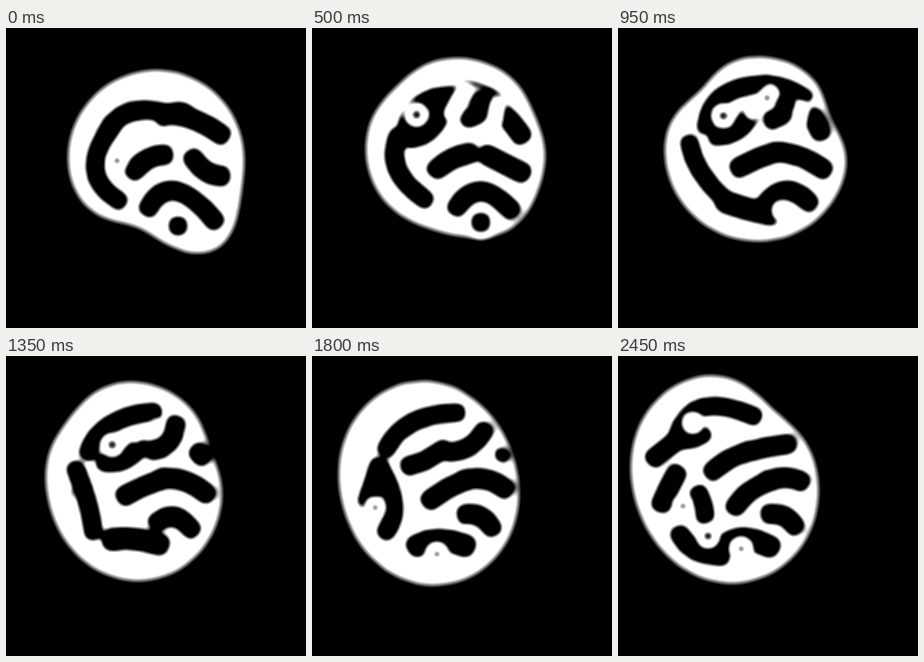
An HTML page with a canvas for the animation above (2.5 s loop, 300 px wide and 300 px high).

```html
<!DOCTYPE html>
<html>
<head>
<meta charset="utf-8">
<style>
  html, body { margin: 0; width: 100%; height: 100%; overflow: hidden; background: #000; }
  canvas { display: block; width: 300px; height: 300px; }
</style>
</head>
<body>
<canvas id="stage" width="300" height="300"></canvas>
<script>
const LOOP = 2500, STEP = 50, FADE = 250, CELL = 3;
const BLACK = '#000', WHITE = '#fff', DEG = Math.PI / 180;

const stage = document.getElementById('stage').getContext('2d');
const grid = document.createElement('canvas');
grid.width = grid.height = 300 / CELL;
const ctx = grid.getContext('2d');
ctx.scale(1 / CELL, 1 / CELL);
ctx.lineCap = 'round';

const clamp = v => Math.min(1, Math.max(0, v));
const smooth = v => (v = clamp(v), v * v * (3 - 2 * v));
const bell = (d, spread) => Math.exp(-((d / spread) ** 2));

// Position on evenly spaced poses, u from 0 to 1
function along(poses, u) {
  const at = clamp(u) * (poses.length - 1);
  const i = Math.min(Math.floor(at), poses.length - 2);
  return poses[i].map((v, k) => v + (poses[i + 1][k] - v) * (at - i));
}

// Parts grow after birth and shrink before death, except across the loop's ends
function size(t, born, dies) {
  const grow = born === 0 ? 1 : smooth((t - born) / FADE);
  const shrink = dies === LOOP ? 1 : smooth((dies - t) / FADE);
  return Math.min(grow, shrink);
}

const path = [[150, 130], [144, 120], [138, 121], [124, 127], [112, 127], [106, 122]];

// Bulges and dents of the outline: angle, spread, height, peak time
const lobes = [
  [56, 26, 22, 0], [107, 30, -17, 0],
  [225, 22, -11, 950], [337, 22, -12, 950],
  [304, 28, -12, LOOP]
];

function radius(angle, t) {
  const tilt = -20 * t / LOOP;
  const stretch = -7 * smooth((t - 900) / 600) * Math.cos(2 * (angle - tilt) * DEG);
  return lobes.reduce((r, [at, spread, height, peak]) => {
    const turn = (angle - at + 540) % 360 - 180;
    return r + height * bell(turn, spread) * bell(t - peak, 480);
  }, 88 + 11 * t / LOOP + stretch);
}

function drawBody(t) {
  const [cx, cy] = along(path, t / LOOP);
  ctx.beginPath();
  for (let a = 0; a < 360; a += 4) {
    const r = radius(a, t);
    ctx.lineTo(cx + r * Math.cos(a * DEG), cy + r * Math.sin(a * DEG));
  }
  ctx.fillStyle = WHITE;
  ctx.filter = 'blur(1px)';
  ctx.fill();
  ctx.filter = 'none';
}

// A band is an arc through three points that drifts from pose to pose
const band = (color, born, dies, width, ...poses) => t => {
  const s = size(t, born, dies);
  if (s < 0.05) return;
  const [ax, ay, mx, my, bx, by] = along(poses, (t - born) / (dies - born));
  ctx.strokeStyle = color;
  ctx.lineWidth = width * s;
  ctx.beginPath();
  ctx.moveTo(ax, ay);
  ctx.quadraticCurveTo(2 * mx - (ax + bx) / 2, 2 * my - (ay + by) / 2, bx, by);
  ctx.stroke();
};

function drawDot(color, diameter, x, y) {
  ctx.fillStyle = color;
  ctx.beginPath();
  ctx.arc(x, y, diameter / 2, 0, 2 * Math.PI);
  ctx.fill();
}

const ring = (born, dies, outer, inner, from, to = from) => t => {
  const s = size(t, born, dies);
  const [x, y] = along([from, to], (t - born) / (dies - born));
  drawDot(WHITE, outer * s, x, y);
  drawDot(BLACK, inner * s, x, y);
};

const parts = [
  // Long left fold
  band(BLACK, 0, LOOP, 19, [112, 172, 89, 140, 106, 98], [112, 170, 83, 143, 72, 116],
    [72, 178, 81, 150, 69, 113], [88, 157, 86, 150, 82, 140]),
  // Arch over the top
  band(BLACK, 0, LOOP, 19, [100, 106, 124, 84, 165, 86], [90, 98, 106, 67, 148, 56],
    [78, 94, 104, 69, 146, 56], [58, 80, 84, 50, 134, 60]),
  band(BLACK, 400, 1200, 14, [152, 54, 170, 58, 188, 68], [152, 54, 170, 58, 188, 68]),
  band(BLACK, 0, 1950, 21, [165, 86, 190, 92, 214, 106], [197, 84, 203, 95, 207, 106],
    [194, 97, 195, 98, 196, 99], [188, 99, 189, 99, 190, 100]),
  // Upper pair that joins into one bar
  band(BLACK, 150, LOOP, 20, [100, 112, 116, 102, 126, 84], [100, 106, 118, 104, 133, 92],
    [95, 115, 109, 104, 128, 96]),
  band(BLACK, 0, LOOP, 20, [158, 88, 170, 84, 180, 86], [157, 91, 167, 82, 166, 62],
    [142, 96, 160, 90, 172, 73], [128, 96, 148, 91, 169, 89]),
  // Middle chevron
  band(BLACK, 0, LOOP, 21, [129, 142, 142, 131, 157, 127], [120, 138, 138, 130, 157, 123],
    [118, 150, 131, 136, 150, 125]),
  band(BLACK, 0, LOOP, 21, [188, 131, 200, 143, 214, 148], [157, 122, 180, 125, 201, 138],
    [150, 125, 167, 121, 181, 124]),
  // Lower chevron
  band(BLACK, 0, LOOP, 20, [143, 179, 170, 163, 208, 192], [147, 178, 168, 163, 192, 174],
    [155, 158, 169, 160, 180, 171], [152, 158, 166, 160, 176, 169]),
  // Folds along the bottom and the left side
  band(BLACK, 600, LOOP, 23, [110, 166, 128, 178, 150, 184], [106, 188, 128, 184, 153, 189],
    [104, 192, 125, 183, 151, 190]),
  band(BLACK, 1850, LOOP, 20, [66, 178, 72, 184, 78, 188], [62, 179, 78, 195, 104, 201]),
  band(BLACK, 1300, LOOP, 21, [74, 106, 72, 120, 66, 140], [57, 119, 50, 132, 43, 147]),
  band(BLACK, 2000, LOOP, 20, [62, 88, 54, 96, 48, 104], [58, 84, 48, 92, 36, 101]),
  band(BLACK, 1850, LOOP, 17, [82, 80, 76, 84, 68, 86], [85, 79, 76, 83, 64, 85]),
  // White prongs and spots
  band(WHITE, 250, 1500, 18, [153, 62, 148, 74, 144, 86], [152, 68, 140, 74, 128, 80]),
  band(WHITE, 250, 1200, 16, [187, 74, 185, 83, 184, 92], [183, 82, 181, 88, 180, 94]),
  ring(0, 950, 34, 19, [172, 198], [166, 191]),
  ring(0, 300, 22, 6, [111, 133]),
  ring(250, 1800, 25, 8, [104, 86], [107, 90]),
  ring(750, 1500, 17, 7, [149, 70]),
  ring(700, 1200, 21, 0, [164, 182]),
  ring(1350, LOOP, 22, 6, [62, 152], [65, 150]),
  ring(1350, LOOP, 25, 6, [126, 202], [123, 192]),
  ring(2050, LOOP, 25, 8, [90, 180]),
  ring(1800, LOOP, 22, 0, [72, 65], [75, 67])
];

function frame() {
  const t = Math.floor(performance.now() % LOOP / STEP) * STEP;
  ctx.fillStyle = BLACK;
  ctx.fillRect(0, 0, 300, 300);
  drawBody(t);
  parts.forEach(draw => draw(t));
  stage.filter = 'blur(2px) contrast(2.2)';
  stage.drawImage(grid, 0, 0, 300, 300);
  requestAnimationFrame(frame);
}
stage.fillRect(0, 0, 300, 300);
frame();
</script>
</body>
</html>
```
